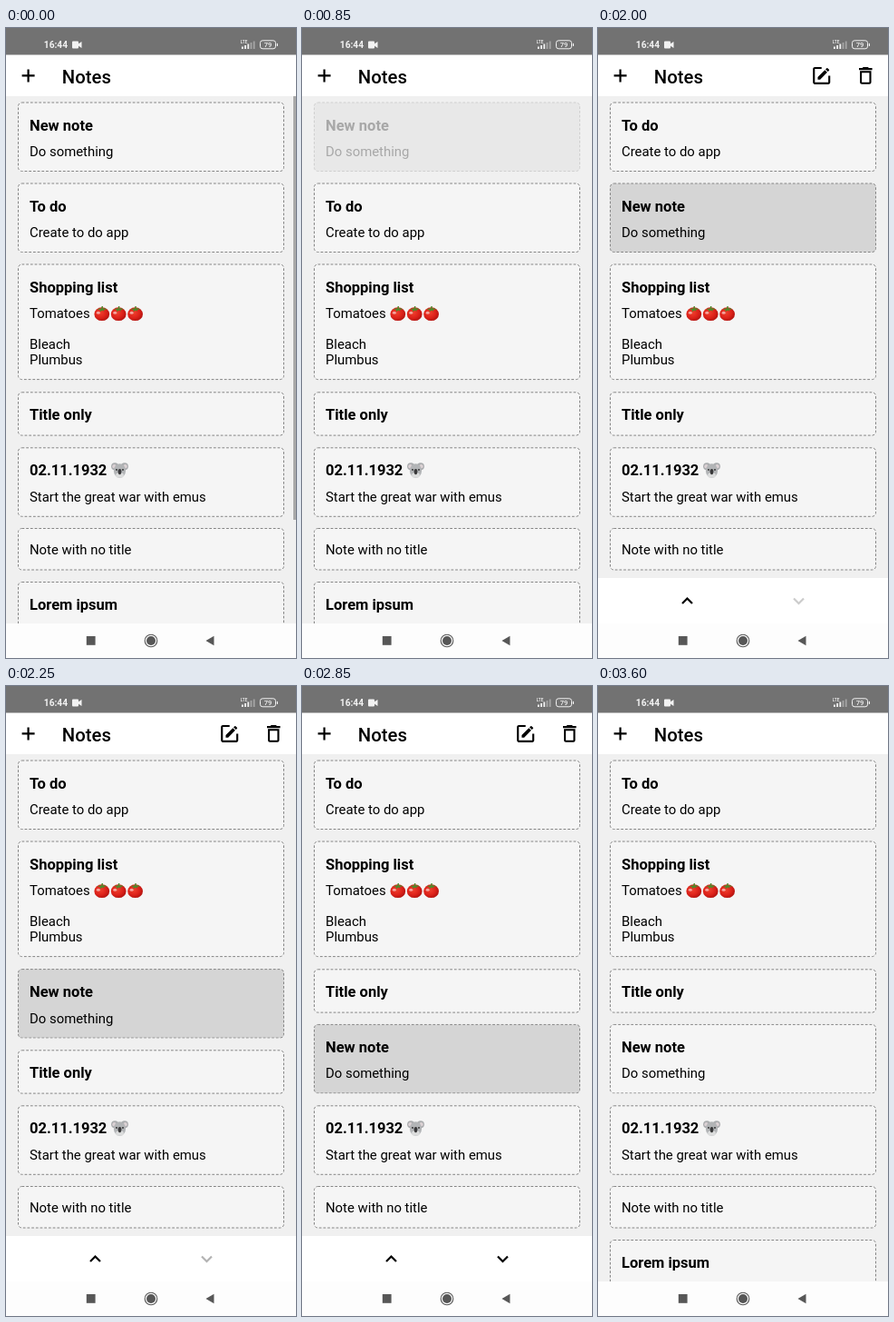
An HTML page for the animation above (3.85 s loop, 320x693 px).

```html
<!DOCTYPE html>
<html lang="en">
<head>
<meta charset="utf-8">
<title>Notes</title>
<style>
  html, body { margin: 0; width: 100%; height: 100%; overflow: hidden; background: #f0f0f0; }
  svg { display: block; width: 100%; height: 100%; font-family: Roboto, sans-serif; }
  .card rect { fill: #f5f5f5; stroke: #858585; stroke-dasharray: 2.8 1.9; }
  .title { font-size: 16.5px; font-weight: 700; }
  .body { font-size: 14.9px; }
  .line { fill: none; stroke: #000; stroke-width: 2.2; }

  .scroll, .press, .press rect, .tools, .down, .new, .todo, .shop, .only {
    animation: 3850ms step-end infinite;
  }
  .scroll { animation-name: scroll; }
  .press { animation-name: press; }
  .press rect { animation-name: select; }
  .tools { animation-name: tools; }
  .down { animation-name: down; }
  .new { animation-name: new; }
  .todo { animation-name: todo; }
  .shop { animation-name: shop; }
  .only { animation-name: only; }

  @keyframes scroll {
    0% { opacity: 1; }
    10.389% { opacity: .7; }
    11.688% { opacity: .35; }
    12.987% { opacity: .1; }
    14.285%, 100% { opacity: 0; }
  }
  @keyframes press {
    0%, 27.272%, 93.506%, 100% { opacity: 1; }
    18.181%, 83.116% { opacity: .2; }
    22.077%, 88.311% { opacity: .3; }
    23.376%, 89.61% { opacity: .51; }
    24.675%, 90.909% { opacity: .79; }
    25.974%, 92.207% { opacity: .96; }
  }
  @keyframes select {
    0%, 88.311%, 100% { fill: #f5f5f5; }
    22.077% { fill: #d5d5d5; }
  }
  @keyframes tools {
    0%, 89.61%, 100% { visibility: hidden; }
    23.376% { visibility: visible; }
  }
  @keyframes down {
    0%, 74.025%, 100% { opacity: 1; }
    38.961%, 51.948%, 61.038% { opacity: .2; }
    46.753%, 58.441%, 68.831% { opacity: .3; }
    48.051%, 59.74%, 70.129% { opacity: .51; }
    49.35%, 71.428% { opacity: .79; }
    50.649%, 72.727% { opacity: .96; }
  }
  @keyframes new {
    0% { translate: 0 0; }
    46.753% { translate: 0 89px; }
    58.441% { translate: 0 229.6px; }
    68.831%, 100% { translate: 0 290.4px; }
  }
  @keyframes todo {
    0% { translate: 0 0; }
    46.753%, 100% { translate: 0 -89px; }
  }
  @keyframes shop {
    0% { translate: 0 0; }
    58.441%, 100% { translate: 0 -89px; }
  }
  @keyframes only {
    0% { translate: 0 0; }
    68.831%, 100% { translate: 0 -89px; }
  }
</style>
</head>
<body>
<svg viewBox="0 0 320 693">
  <defs>
    <radialGradient id="red" cx=".4" cy=".4" r=".7">
      <stop offset="0" stop-color="#f0402f"/>
      <stop offset=".55" stop-color="#dd221a"/>
      <stop offset="1" stop-color="#a80f0d"/>
    </radialGradient>
    <g id="tomato">
      <ellipse cy=".7" rx="8.4" ry="7.4" fill="url(#red)"/>
      <ellipse cx="-4" cy="-.8" rx="2" ry="1.5" fill="#fff" opacity=".55"/>
      <path d="M-5 -4.6Q-2.6 -6 -.6 -5.4L-.2 -8H1.2L1 -5.4Q3.6 -6.2 5.6 -4.4Q3 -4.6 2 -4L2.8 -2.2L.3 -3.6L-1.8 -1.8L-2 -4Q-3.6 -4.6 -5 -4.6Z" fill="#4f8a2c"/>
    </g>
    <g id="koala">
      <g fill="#a9abad">
        <circle cx="-5.4" cy="-4" r="4"/>
        <circle cx="5.4" cy="-4" r="4"/>
      </g>
      <g fill="#dcd2d5">
        <circle cx="-6" cy="-4" r="2.2"/>
        <circle cx="6" cy="-4" r="2.2"/>
      </g>
      <ellipse cy=".8" rx="6.6" ry="7.8" fill="#b2b4b6"/>
      <ellipse cy="5.6" rx="4.4" ry="2.9" fill="#dcdddd"/>
      <ellipse cy="1.8" rx="1.9" ry="3.1" fill="#39393b"/>
      <circle cx="-3.5" cy="-.4" r=".9" fill="#222"/>
      <circle cx="3.5" cy="-.4" r=".9" fill="#222"/>
    </g>
  </defs>

  <rect width="320" height="693" fill="#f0f0f0"/>

  <g class="card todo"><g transform="translate(13.5 171)">
    <rect width="293" height="75.5" rx="4"/>
    <text class="title" x="12.5" y="30.6">To do</text>
    <text class="body" x="12.5" y="59">Create to do app</text>
  </g></g>
  <g class="card shop"><g transform="translate(13.5 260)">
    <rect width="293" height="126.6" rx="4"/>
    <text class="title" x="12.5" y="30.6">Shopping list</text>
    <text class="body" x="12.5" y="59">Tomatoes</text>
    <use href="#tomato" x="92.3" y="54"/>
    <use href="#tomato" x="110.7" y="54"/>
    <use href="#tomato" x="129.1" y="54"/>
    <text class="body" x="12.5" y="93.2">Bleach</text>
    <text class="body" x="12.5" y="110.3">Plumbus</text>
  </g></g>
  <g class="card only"><g transform="translate(13.5 400.8)">
    <rect width="293" height="47.3" rx="4"/>
    <text class="title" x="12.5" y="30.6">Title only</text>
  </g></g>
  <g class="card new"><g class="press" transform="translate(13.5 82)">
    <rect width="293" height="75.5" rx="4"/>
    <text class="title" x="12.5" y="30.6">New note</text>
    <text class="body" x="12.5" y="59">Do something</text>
  </g></g>
  <g class="card" transform="translate(13.5 461.8)">
    <rect width="293" height="75.5" rx="4"/>
    <text class="title" x="12.5" y="30.6">02.11.1932</text>
    <use href="#koala" x="112" y="24.5"/>
    <text class="body" x="12.5" y="59">Start the great war with emus</text>
  </g>
  <g class="card" transform="translate(13.5 550.5)">
    <rect width="293" height="45.5" rx="4"/>
    <text class="body" x="12.5" y="28.7">Note with no title</text>
  </g>
  <g class="card" transform="translate(13.5 609.5)">
    <rect width="293" height="75.5" rx="4"/>
    <text class="title" x="12.5" y="30.6">Lorem ipsum</text>
  </g>
  <rect class="scroll" x="317" y="75" width="3" height="466" fill="#a9a9a9"/>

  <!-- header -->
  <rect y="29" width="320" height="46" fill="#fff"/>
  <path class="line" d="M17.6 52.4H31.6M24.6 45.4V59.4"/>
  <text x="61.8" y="61" font-size="20.3" font-weight="500">Notes</text>

  <!-- status bar -->
  <rect width="320" height="29.5" fill="#727272"/>
  <g fill="#f2f2f2">
    <text x="41.8" y="22.4" font-size="10.2" font-weight="700">16:44</text>
    <path d="M73 15.5q0-1 1-1h5q1 0 1 1v1.7l3.5-2.2v7l-3.5-2.2v1.7q0 1-1 1h-5q-1 0-1-1z"/>
    <text x="258.7" y="16.8" font-size="4.8" font-weight="500">LTE</text>
    <path d="M260 20.5h1.8v2.5h-1.8zM263.2 19h1.8v4h-1.8zM266.4 17.5h1.8v5.5h-1.8z"/>
    <path d="M269.6 16h1.8v7h-1.8zM272.8 14.5h1.8v8.5h-1.8z" opacity=".4"/>
    <rect x="280.5" y="13.8" width="17" height="9" rx="2.6" fill="none" stroke="#f2f2f2"/>
    <rect x="298.8" y="16.8" width="1.2" height="3.2" rx=".6"/>
    <text x="289" y="21.1" font-size="7.6" font-weight="500" text-anchor="middle">79</text>
  </g>

  <!-- selection tools -->
  <g class="tools">
    <path transform="translate(234 39.7) scale(1.06)" d="M5 3c-1.11 0-2 .89-2 2v14c0 1.11.89 2 2 2h14c1.11 0 2-.89 2-2v-7h-2v7H5V5h7V3H5m12.78 1c-.17 0-.35.07-.48.2l-1.22 1.21 2.5 2.5L19.8 6.7c.26-.26.26-.7 0-.95L18.25 4.2c-.13-.13-.3-.2-.47-.2m-2.41 2.12L8 13.5V16h2.5l7.37-7.38-2.5-2.5z"/>
    <path transform="translate(282.8 39.9) scale(1.04)" d="M6 19a2 2 0 0 0 2 2h8a2 2 0 0 0 2-2V7H6v12M8 9h8v10H8V9m7.5-5l-1-1h-5l-1 1H5v2h14V4h-3.5z"/>
    <rect y="605" width="320" height="50" fill="#fff"/>
    <path class="line" d="M93 633l5.5-5.5l5.5 5.5"/>
    <path class="line down" d="M216 627.5l5.5 5.5l5.5-5.5"/>
  </g>

  <!-- system navigation -->
  <rect y="655" width="320" height="38" fill="#fdfdfd"/>
  <g fill="#575757">
    <rect x="88.8" y="669" width="9.8" height="9.8"/>
    <circle cx="160" cy="674" r="5"/>
    <circle cx="160" cy="674" r="6.8" fill="none" stroke="#575757" stroke-width="1.1"/>
    <path d="M220.5 674L229.5 668.8V679.2Z"/>
  </g>
</svg>
</body>
</html>
```
